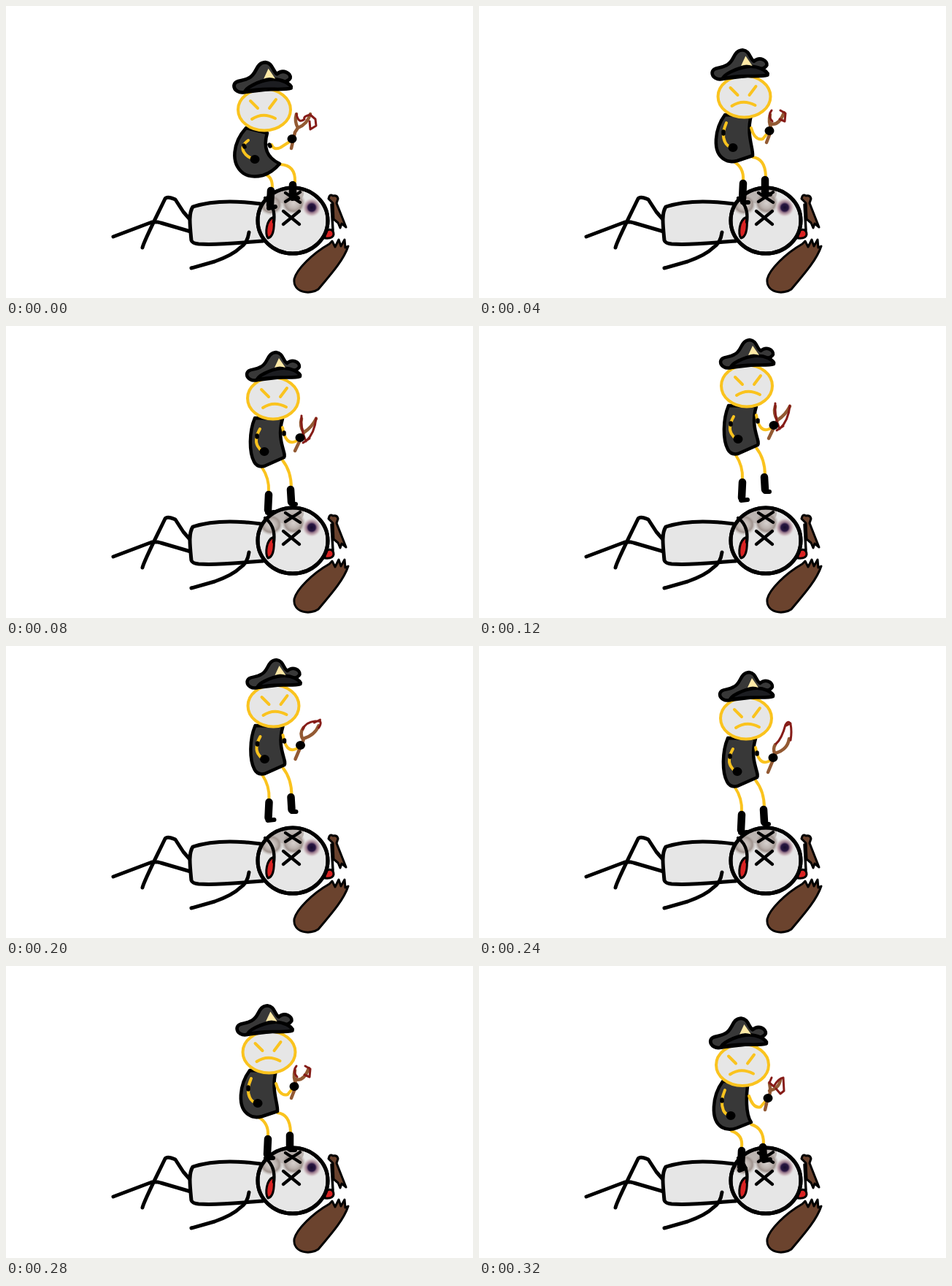
An HTML page that plays this animation: 640 px wide and 400 px high, repeating every 360 ms.

```html
<!DOCTYPE html>
<html lang="en">
<head>
<meta charset="utf-8">
<title>Jump</title>
<style>
  html, body { margin: 0; width: 100%; height: 100%; overflow: hidden; background: #fff; }
  svg { display: block; width: 100%; height: 100%; }
  path, ellipse { stroke-linecap: round; stroke-linejoin: round; }
  .line { fill: none; stroke: #000; stroke-width: 5; }
  .skin { fill: #e6e6e6; stroke: #000; stroke-width: 5; }
  .bat { fill: #6b432e; stroke: #000; stroke-width: 3; }
  .red { fill: #d92323; stroke: #000; stroke-width: 3; }
  .gold { fill: none; stroke: #fac31e; stroke-width: 4; }
  .face { fill: #e6e6e6; stroke: #fac31e; stroke-width: 4; }
  .coat { fill: #383838; stroke: #000; stroke-width: 4.5; }
  .boot { fill: none; stroke: #000; stroke-width: 10.5; }
  .foot { fill: none; stroke: #000; stroke-width: 6; }
  .cuff { fill: none; stroke: #000; stroke-width: 5.5; }
  .wood { fill: none; stroke: #935a33; stroke-width: 4.5; }
  .band { fill: none; stroke: #861c18; stroke-width: 3; }
</style>
</head>
<body>
<svg viewBox="0 0 640 400" preserveAspectRatio="none">
  <defs>
    <radialGradient id="bruise">
      <stop offset="0" stop-color="#d6d0cd"/>
      <stop offset=".45" stop-color="#bdb4b0"/>
      <stop offset=".7" stop-color="#a0948f"/>
      <stop offset="1" stop-color="#c8c2bf" stop-opacity="0"/>
    </radialGradient>
    <radialGradient id="wound">
      <stop offset="0" stop-color="#170c2c"/>
      <stop offset=".38" stop-color="#2a1642"/>
      <stop offset=".55" stop-color="#98798d"/>
      <stop offset=".75" stop-color="#c7b1b8"/>
      <stop offset="1" stop-color="#dccfd2" stop-opacity="0"/>
    </radialGradient>
    <clipPath id="skull"><ellipse cx="393" cy="294" rx="48" ry="45"/></clipPath>
    <g id="hat" transform="translate(-367 -38)">
      <path class="coat" d="M345 57C338 59 331 55 331 49C332 41 342 44 350 39C361 34 358 20 371 19C381 20 380 30 386 34C394 27 404 33 403 39Q401 43 395 44L404 50Z"/>
      <path d="M345 57C345 52 362 43 377 41C391 39 405 47 404 52C392 56 367 50 345 57Z" fill="#1c1d21" stroke="#000" stroke-width="4.5"/>
      <path d="M375 27L369 40Q376 37 384 40Z" fill="#ffe9a6"/>
    </g>
  </defs>

  <path class="line" d="M147 316L200 296Q206 295 212 297L253 309M187 331C189 322 205 291 218 264Q221 260 232 265L243 282L257 298"/>
  <path class="skin" d="M349 271C312 266 280 267 256 275C250 284 252 300 254 321Q255 325 264 326C292 328 320 324 352 322"/>
  <path class="line" d="M254 359L286 350Q311 341 321 331Q331 325 333 310"/>

  <path class="line" style="stroke-width:3.5" d="M446 272L448 307"/>
  <path class="bat" d="M442 264Q443 257 448 260Q454 259 455 264L453 270L466 303L460 298L458 304L455 297L449 292L448 270Z"/>
  <path class="bat" d="M395 374C398 361 420 339 443 326L447 322L451 330L456 320L459 329L464 320L465 331L469 329C462 350 442 371 428 388C417 396 393 393 395 374Z"/>
  <path class="red" d="M437 308Q449 303 449 313Q448 319 437 318Z"/>
  <ellipse class="skin" cx="393" cy="294" rx="48" ry="45"/>
  <g clip-path="url(#skull)">
    <ellipse cx="386" cy="257" rx="22" ry="14" fill="#a0948f" opacity=".6"/>
    <ellipse cx="363" cy="272" rx="17" ry="15" fill="url(#bruise)"/>
    <ellipse cx="394" cy="270" rx="17" ry="16" fill="url(#bruise)"/>
    <ellipse cx="419" cy="276" rx="13" ry="13" fill="url(#wound)"/>
  </g>
  <ellipse class="line" cx="393" cy="294" rx="48" ry="45"/>
  <path class="red" d="M367 289C356 293 355 312 359 318C367 316 368 302 367 289Z"/>
  <path class="line" style="stroke-width:4.2" d="M355 263Q370 274 367 296M383 256L403 269M403 255L383 268M380 281L402 299M402 281L380 299"/>
  <g id="jumper"></g>
</svg>

<script>
const STEP = 40;

// Each pose: coat, legs, boots, arms, hands; head and hat by centre, hat with its scale.
const poses = {
  crouch: {
    head: [354, 142, 36], look: -3, hat: [351, 97.5, 1.07],
    coat: 'M329 167C311 187 307 215 325 229Q335 236 352 232Q365 228 375 216C358 208 352 194 358 174Z',
    legs: 'M347 229Q365 229 365 248M376 217Q397 218 396 241',
    boots: 'M363 253L362 273M393 245L393 261', feet: 'M360 277L369 275M392 264L400 263',
    arms: 'M332 184Q321 192 326 200Q330 207 340 210M364 190Q367 198 376 194L390 185',
    cuffs: 'M326 191L327 193M361 190L362 192', hands: [[341, 210], [392, 182]]
  },
  bend: {
    head: [361, 135.5, 36], look: -3, hat: [355, 91.5, 1.05],
    coat: 'M334 158C320 177 316 211 333 221Q342 226 353 222L373 214C365 203 366 176 369 158Z',
    legs: 'M346 226Q362 231 360 248M373 217Q390 222 390 243',
    boots: 'M360 253L359 275M389 248L390 264', feet: 'M357 280L365 277M390 267L399 265',
    arms: 'M337 170Q330 186 335 198Q338 204 345 205M370 178Q376 196 386 193L396 181',
    cuffs: 'M333 183L333 185', hands: [[345, 205], [396, 181]]
  },
  rise: {
    head: [363.5, 124, 36], look: -3, hat: [357, 80, 1.04],
    coat: 'M337 149C323 168 319 200 336 210Q343 215 354 212L375 205C376 194 366 176 373 150Z',
    legs: 'M349 213Q363 221 362 238M375 207Q392 209 393 233',
    boots: 'M362 243L361 264M392 238L392 255', feet: 'M361 269L369 269M393 258L399 258',
    arms: 'M339 160Q332 176 337 186Q340 193 348 194M373 167Q378 185 389 182L398 171',
    cuffs: 'M335 172L335 175', hands: [[348, 194], [398, 171]]
  },
  air: {
    head: [367, 82, 35], look: 0, hat: [367, 38, 1],
    coat: 'M342 109C334 128 334 156 341 169Q345 177 355 175L382 163C386 157 371 140 380 110Z',
    legs: 'M352 177Q362 192 361 210M380 167Q392 182 392 205',
    boots: 'M361 214L360 235M391 207L392 224', feet: 'M359 239L368 238M392 227L398 227',
    arms: 'M349 124Q340 140 347 149Q350 154 355 155M380 122Q384 147 398 141L404 136',
    cuffs: 'M345 133L345 135M382 129L382 131', hands: [[355, 155], [404, 136]]
  }
};

// Wood and rubber band of the slingshot.
const slings = {
  low: ['M391 195L396 173L400 167Q395 158 398 148M400 167Q413 162 417 148',
        'M398 148Q401 162 409 155Q407 151 417 149L424 155L425 164L417 169L416 158'],
  bent: ['M392 197L396 180Q401 175 398 160M398 171Q411 168 413 156',
         'M401 153L398 160L404 165Q410 154 417 153L418 171L413 175L407 168'],
  tucked: ['M394 187L401 169Q396 158 399 149M399 161Q411 165 418 146',
           'M401 143Q395 150 402 158M413 143L420 147L419 158L412 155'],
  drawn: ['M397 154L409 129Q403 120 406 110M409 129Q420 122 426 110',
          'M406 106Q404 122 412 141Q424 130 426 109M408 143L417 137'],
  flip: ['M397 155L408 130Q402 121 406 111M408 129Q420 123 428 109',
         'M406 111Q414 121 420 117Q427 117 429 108'],
  loop: ['M397 155L408 129Q402 120 408 112M408 127Q424 122 429 109',
         'M407 114Q412 104 424 103L431 103Q433 107 429 112M423 105L431 101'],
  raised: ['M397 156L407 132Q403 124 407 118M407 130Q424 125 426 110',
           'M408 117Q416 110 421 91Q425 84 428 90Q430 100 428 112M422 92L428 89']
};

const timeline = [
  ['crouch', 0, 0, 'low'],
  ['rise', 0, 0, 'tucked'],
  ['air', -1, 17, 'drawn'],
  ['air', 0, 0, 'drawn'],
  ['air', 0, -8, 'flip'],
  ['air', -0.5, 0, 'loop'],
  ['air', -1, 17, 'raised'],
  ['rise', -3, -6, 'tucked'],
  ['bend', 0, 0, 'bent']
];

const path = (name, d) => `<path class="${name}" d="${d}"/>`;

function figure([poseName, dx, dy, slingName]) {
  const p = poses[poseName];
  const [wood, band] = slings[slingName];
  const [x, y, rx] = p.head;
  const [hatX, hatY, hatScale] = p.hat;
  const hands = p.hands.map(([cx, cy]) => `<ellipse cx="${cx}" cy="${cy}" rx="6.5" ry="6"/>`).join('');
  return `<g visibility="hidden" transform="translate(${dx} ${dy})">
    ${path('gold', p.legs)}${path('boot', p.boots)}${path('foot', p.feet)}
    ${path('coat', p.coat)}${path('gold', p.arms)}${path('cuff', p.cuffs)}
    ${path('wood', wood)}${path('band', band)}${hands}
    <g transform="translate(${x} ${y})">
      <ellipse class="face" rx="${rx}" ry="28.5"/>
      <g transform="translate(${p.look})">
        ${path('gold', 'M-16 -12L-6 -2M19 -14L10 -2M-14 13Q1 3 18 12')}
      </g>
    </g>
    <use href="#hat" transform="translate(${hatX} ${hatY}) scale(${hatScale})"/>
  </g>`;
}

const jumper = document.getElementById('jumper');
jumper.innerHTML = timeline.map(figure).join('');
const figures = [...jumper.children];
const start = performance.now();

function draw(now) {
  const index = Math.floor(Math.max(0, now - start) / STEP) % figures.length;
  figures.forEach((el, i) => el.setAttribute('visibility', i === index ? 'visible' : 'hidden'));
  requestAnimationFrame(draw);
}
draw(start);
</script>
</body>
</html>
```
